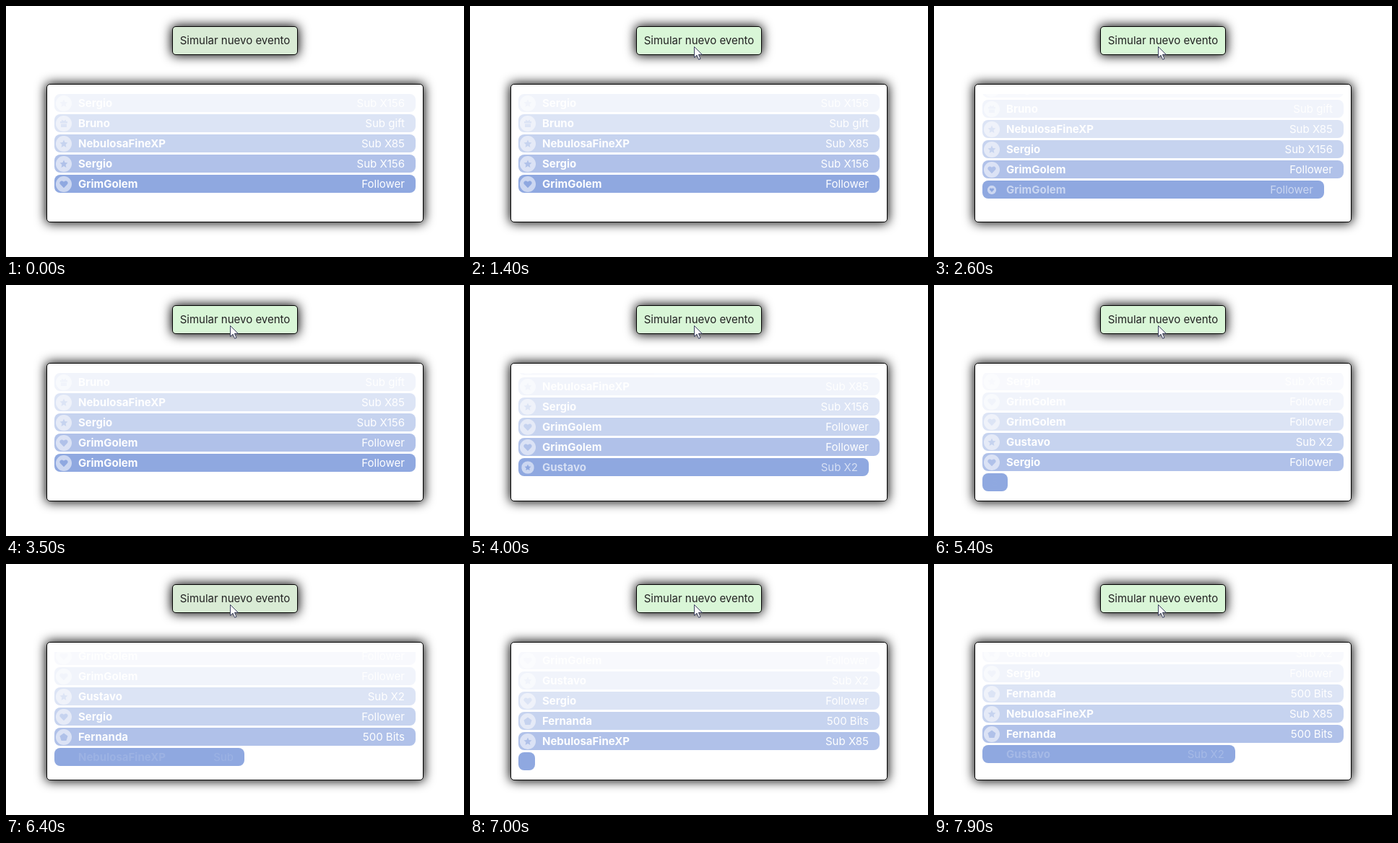
Recreate the animation shown at these times as an HTML page. Size 634 by 348 pixels, loop 8 s.

```html
<!DOCTYPE html>
<html lang="es">
<head>
<meta charset="utf-8">
<title>Eventos</title>
<style>
  html, body { margin: 0; width: 100%; height: 100%; overflow: hidden; background: #fff; }
  #stage { position: relative; width: 634px; height: 348px; overflow: hidden; font: 15px Inter, "Open Sans", sans-serif; }
  #stage > * { position: absolute; box-sizing: border-box; }
  .box { border: 1px solid #000; border-radius: 5px; box-shadow: 0 0 15px 1px #000; }
  #button { left: 230px; top: 28px; width: 174px; height: 40px; line-height: 38px; text-align: center; white-space: nowrap; color: #222; }
  #panel { left: 56px; top: 108px; width: 522px; height: 192px; background: #fff; }
  #list { left: 67px; top: 122px; width: 500px; height: 168px; overflow: hidden; }
  .row { position: absolute; left: 0; height: 25px; border-radius: 8px; overflow: hidden; background: #8fa8e0; color: #fff; line-height: 25px; }
  .row > * { position: absolute; top: 0; }
  .row svg { left: 2px; top: 1.5px; width: 22px; height: 22px; }
  .row circle { fill: #fff; opacity: .55; }
  .row path { fill: #8fa8e0; }
  .name { left: 33px; font-weight: 700; white-space: nowrap; }
  .label { right: 15px; width: 20%; height: 25px; overflow: hidden; text-align: right; }
  #cursor { left: 0; top: 0; width: 14px; height: 21px; overflow: visible; }
</style>
</head>
<body>
<div id="stage">
  <div id="button" class="box">Simular nuevo evento</div>
  <div id="panel" class="box"></div>
  <div id="list"></div>
  <svg id="cursor" viewBox="0 0 14 21">
    <path d="M.5 .5V15.5L4 12.2L6.6 18.2L9 17.2L6.4 11.3H11.3Z" fill="#fff" stroke="#3c4260" stroke-linejoin="round"/>
  </svg>
</div>
<script>
const LOOP = 8000, GROW = 500, PITCH = 28, REST = 112, WIDTH = 500;
const FADE = [1, .7, .5, .3, .12, .06];

const ICONS = {
  heart: 'M11 16.2L6.2 11.3C3.6 8.2 7.8 4.400 11 7.700C14.200 4.400 18.400 8.200 15.800 11.300Z',
  star: 'M11 5.5L12.6 9.100L16.500 9.500L13.600 12.100L14.400 16L11 14L7.600 16L8.400 12.100L5.500 9.500L9.400 9.100Z',
  gift: 'M6 8H16V10.600H6ZM7 11.400H15V16H7ZM8 5.500L11 7.500L14 5.500V8H8Z',
  gem: 'M11 5.500L16.500 9.600L14.400 16H7.600L5.500 9.600Z'
};

// start time, name, label, icon
const EVENTS = [
  [-1e4, 'Bruno', 'Follower', 'heart'],
  [-1e4, 'Sergio', 'Sub X156', 'star'],
  [-1e4, 'Bruno', 'Sub gift', 'gift'],
  [-1e4, 'NebulosaFineXP', 'Sub X85', 'star'],
  [-1e4, 'Sergio', 'Sub X156', 'star'],
  [-1e4, 'GrimGolem', 'Follower', 'heart'],
  [2245, 'GrimGolem', 'Follower', 'heart'],
  [3610, 'Gustavo', 'Sub X2', 'star'],
  [4490, 'Sergio', 'Follower', 'heart'],
  [5360, 'Fernanda', '500 Bits', 'gem'],
  [6248, 'NebulosaFineXP', 'Sub X85', 'star'],
  [6970, 'Fernanda', '500 Bits', 'gem'],
  [7695, 'Gustavo', 'Sub X2', 'star']
];

const list = document.getElementById('list');
const button = document.getElementById('button');
const cursor = document.getElementById('cursor');

const rows = EVENTS.map(([start, name, label, icon]) => {
  const el = document.createElement('div');
  el.className = 'row';
  el.innerHTML = `<svg viewBox="0 0 22 22"><circle cx="11" cy="11" r="11"/><path d="${ICONS[icon]}"/></svg>` +
    `<span class="name">${name}</span><span class="label">${label}</span>`;
  list.append(el);
  const [badge, ...texts] = el.children;
  return { start, el, badge, texts };
});

const clamp = v => Math.min(1, Math.max(0, v));
const smooth = v => v * v * (3 - 2 * v);
const mix = (a, b, k) => a + (b - a) * k;

// The CSS "ease" curve
function ease(x) {
  if (x <= 0 || x >= 1) return clamp(x);
  let lo = 0, hi = 1, s;
  for (let i = 0; i < 20; i++) {
    s = (lo + hi) / 2;
    if (.75 * s * (1 - s) + s ** 3 < x) lo = s; else hi = s;
  }
  return .3 * s * (1 - s) ** 2 + 3 * s * s * (1 - s) + s ** 3;
}

function drawRows(now) {
  const newest = rows.filter(r => r.start <= now).length - 1;
  const lift = clamp((now - rows[newest].start) / GROW);
  const shift = Math.ceil(PITCH * (1 - mix(lift, smooth(lift), .4)));
  rows.forEach(({ start, el, badge, texts }, i) => {
    const age = newest - i;
    const shown = age >= 0 && age < FADE.length;
    el.style.display = shown ? '' : 'none';
    if (!shown) return;
    const p = clamp((now - start) / GROW);
    el.style.top = REST - PITCH * age + shift + 'px';
    el.style.width = Math.round(WIDTH * ease(p)) + 'px';
    el.style.opacity = FADE[age];
    badge.style.transform = `scale(${clamp((p - .55) / .29)})`;
    for (const text of texts) text.style.opacity = p ** 1.8;
  });
}

function drawPointer(now) {
  const k = smooth(clamp((now - 500) / 600));
  cursor.style.visibility = now < 500 ? 'hidden' : 'visible';
  cursor.style.transform = `translate(${mix(410, 310, Math.sqrt(k))}px, ${mix(268, 56, k)}px)`;
  const pressed = rows.some(r => now - r.start > 90 && now - r.start < 190);
  const hover = pressed ? 0 : clamp((now - 1000) / 200);
  button.style.background = `rgb(217, ${mix(235, 246, hover)}, ${mix(213, 215, hover)})`;
}

function frame() {
  const now = performance.now() % LOOP;
  drawRows(now);
  drawPointer(now);
  requestAnimationFrame(frame);
}
frame();
</script>
</body>
</html>
```
